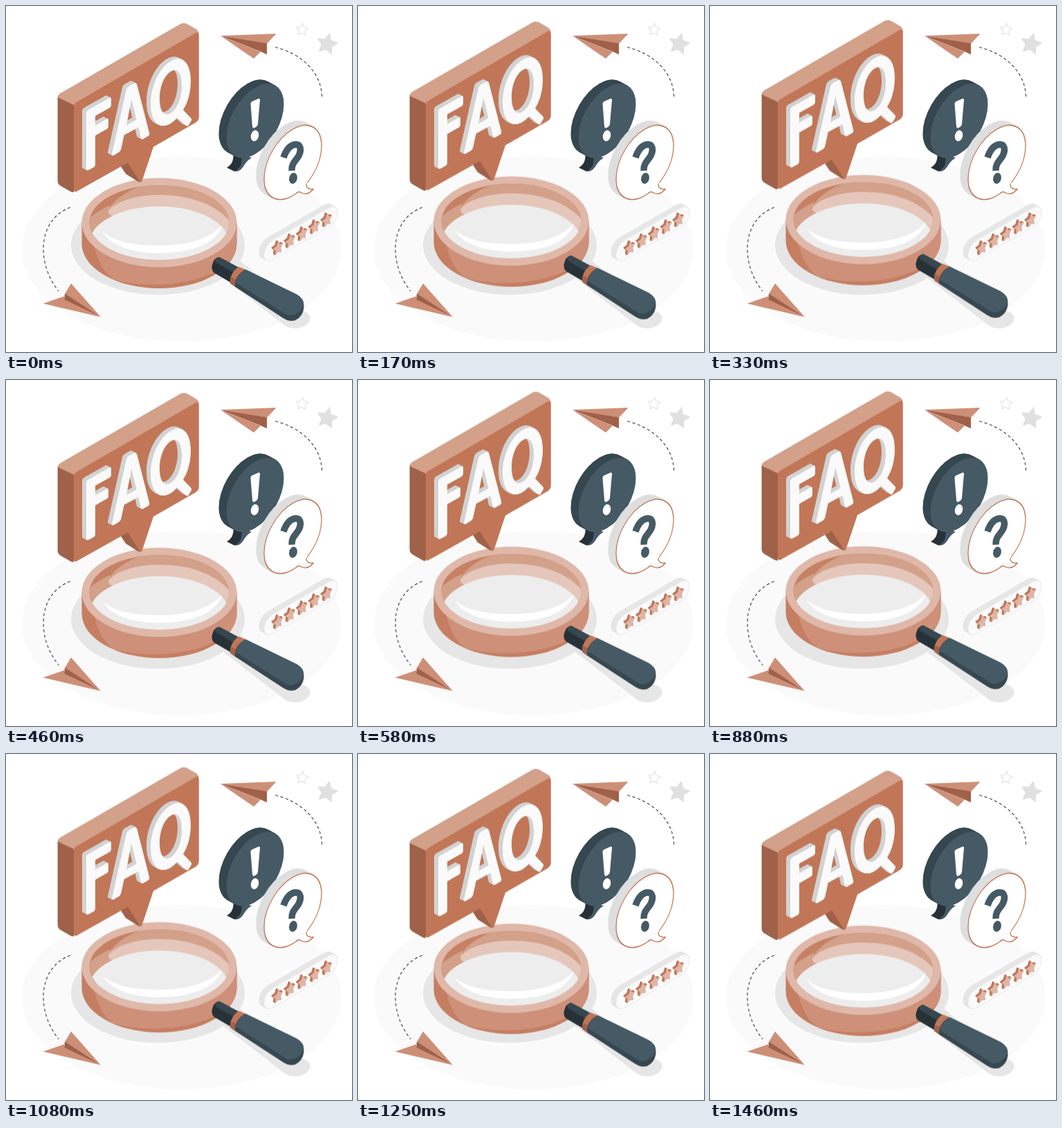
Animation of 500x500 px, one loop 1500 ms. Source, as an HTML page:

```html
<!DOCTYPE html>
<html lang="en">
<head>
<meta charset="utf-8">
<title>FAQ</title>
<style>
  html, body { margin: 0; width: 100%; height: 100%; overflow: hidden; background: #fff; }
  svg { display: block; width: 100%; height: 100%; }
  .float { animation: float 1.5s linear infinite; }
  @keyframes float { 50% { transform: translateY(-10px); } }
  .trail { fill: none; stroke: #4a4a4a; stroke-width: 1.2; stroke-dasharray: 4.2 3.6; }
  .light { fill: #ce8f77; }
  .mid { fill: #c17657; }
  .dark { fill: #9f6149; }
</style>
</head>
<body>
<svg viewBox="0 0 500 500" role="img" aria-label="FAQ">
  <defs>
    <path id="star" stroke-linejoin="round" d="M0-10L2.9-4L9.5-3.1L4.8 1.5L5.9 8.1L0 5L-5.9 8.1L-4.8 1.5L-9.5-3.1L-2.9-4Z"/>
    <g id="rating-star"><use href="#star" transform="matrix(.68 -.39 0 .9 0 0)" stroke-width="1.5"/></g>
    <ellipse id="oval" rx="41.5" ry="48" transform="matrix(1 -.577 0 1 0 0)"/>
    <rect id="pill" x="-53" y="-14" width="106" height="28" rx="13" transform="matrix(1 -.577 0 1 0 0)"/>
    <g id="letters" fill-rule="evenodd">
      <path d="M116 154Q116 151 118.500 149.500L149.500 132Q152 130.800 152 133.500V142.500Q152 145 150 146.200L129 158V172L145.500 162.700Q148 161.500 148 164V173Q148 175.500 146 176.700L129 186.500V228.500Q129 231 127 232.200L119 236.500Q116 237.700 116 234.500Z"/>
      <path d="M174 120Q175 116.500 178 114.700L185.500 110.800Q188.500 109.500 189.300 113L207.300 183.500Q207.900 186 205.500 187.300L198.500 191.200Q195.500 192.800 194.900 190L191.500 174.500L170.700 185.700L166.300 206Q165.700 209 163.300 210.500L156 214.800Q152.300 216.500 153.200 212.500ZM181.300 134L174 171.700L188.500 163.500Z"/>
      <path d="M238 79C255 69 267 82 267 107.300C267 125 262.500 139 256 149.500L267.500 161.500Q269 163 267.500 165.500L264 171.500Q262.300 174 260 171.700L247.500 160.500Q243 166 238 169C221 179 209 166 209 140.700C209 116 221 89 238 79ZM238 94C228 100 222 117 222 133.200C222 151 228 160 238 154C248 148 254 131 254 114.800C254 97 248 88 238 94Z"/>
    </g>
    <clipPath id="hole"><ellipse cx="221.500" cy="313" rx="101" ry="54"/></clipPath>
    <clipPath id="wall"><path d="M109.500 313V343.500A112 64.500 0 0 0 333.500 343.500V313Z"/></clipPath>
  </defs>

  <ellipse cx="254" cy="351.500" rx="231" ry="133.500" fill="#fafafa"/>
  <g fill="#e6e6e6">
    <ellipse cx="219.500" cy="345.500" rx="125.500" ry="72"/>
    <path d="M290 375L318 396L402 461Q411 468 425 465Q440 460 439.500 450Q438 443 428 440L330 362Z"/>
  </g>

  <path class="trail" d="M389 59.500C428 69 456 97 456.500 131"/>
  <path class="light" d="M310 43L390.500 40L377 54.500Z"/>
  <path class="dark" d="M310 43L377 54V70L366 65Z"/>
  <path class="light" d="M310 43L368 66L358 76Z"/>

  <path class="trail" d="M93 291C46 308 43 371 76 412"/>
  <path class="light" d="M94 401L137 449.500L85 416Z"/>
  <path class="dark" d="M85 415.500L137 449.500L84 425Z"/>
  <path class="light" d="M53.500 430L84 419.500V424L137 449.500Z"/>

  <use href="#star" transform="translate(428 34.500) rotate(6) scale(.93)" fill="#fff" stroke="#e3e3e3" stroke-width="1.2"/>
  <use href="#star" transform="translate(464 55) rotate(12) scale(1.48)" fill="#e0e0e0" stroke="#e0e0e0" stroke-width="1.2"/>

  <path fill="#263238" d="M328 208C330 222 327 229 319 233.500L330 239C343 238 342 228 347 218Z"/>
  <path fill="#455a64" d="M340 214C342 228 339 234 330 239C344 240 342 226 355 219.500Z"/>
  <g data-shape="oval" data-at="360 166" data-depth="11 6" data-side="#37474f" fill="#455a64"></g>
  <g fill="#fff">
    <path d="M353.500 141.500Q353.300 139 355.500 138L364.500 134Q367.300 133 367 136L364 170.500Q363.700 173.500 361 175L358.500 176.300Q356.300 177 356 174Z"/>
    <ellipse cx="359.500" cy="187.500" rx="5.600" ry="8" transform="rotate(14 359.500 187.500)"/>
  </g>

  <g data-shape="oval" data-at="414.500 226" data-depth="11 6" data-side="#dedede" fill="#fff" stroke="#c17657" stroke-width="1.3"></g>
  <path fill="#fff" d="M421 266L434 254L437 264L432 270Z"/>
  <path fill="#fff" stroke="#c17657" stroke-width="1.3" d="M419.500 270.500C423 267 425 269 428 270.500C434 272.500 440 270 444 264.500C438 265.500 433.500 263 434 257"/>
  <path fill="none" stroke="#455a64" stroke-width="9.500" d="M401 219C405 207 411 201 418 200C426 199.500 427 208 423.500 215.500C420 223 412.500 226 413 238"/>
  <ellipse cx="415" cy="249" rx="5.800" ry="8" fill="#455a64" transform="rotate(14 415 249)"/>

  <g data-shape="pill" data-at="426 329" data-depth="7 4" data-side="#e6e6e6" fill="#fafafa" stroke="#e6e6e6" stroke-width=".8"></g>
  <g id="rating"></g>

  <g class="float">
    <path fill="#c57e61" d="M109.500 313V343.500A112 64.500 0 0 0 333.500 343.500V313Z"/>
    <path fill="#ce9079" clip-path="url(#wall)" d="M126 340C132 369 141 386 157 396C203 407 262 405 302 384L334 360V313Z"/>
    <ellipse cx="221.500" cy="313" rx="112" ry="64.500" fill="#dfb8a9"/>
    <g clip-path="url(#hole)">
      <rect x="115" y="250" width="215" height="125" fill="#c68164"/>
      <path fill="#d3a089" d="M212 255C182 262 156 278 148 295Q149 306 160 304L330 340V250Z"/>
      <path fill="#d3a089" d="M115 312C126 301 137 294 150 288L156 306L126 332H115Z"/>
      <path fill="#e5c6ba" d="M148 296C160 281 190 273 222 273C264 273 304 286 326 314V345L157 304Q147 303 148 296Z"/>
      <ellipse cx="221.500" cy="343" rx="101" ry="53.500" fill="#ededed"/>
      <path fill="#fff" d="M140 326C158 342 188 346 222 346C262 346 294 337 312 317C304 344 266 357 222 357C184 357 151 347 140 326Z"/>
    </g>

    <g transform="translate(0 .8)">
      <path fill="#263238" d="M308 362L336 377L325 399L301 385Q297 382 297.500 375Q300 363 308 362Z"/>
      <path fill="#37474f" d="M308 362L336 377L331 386L302 369Q304 362.500 308 362Z"/>
      <path class="mid" d="M336 376L346 380L331 405L324 400Q323 386 336 376Z"/>
      <path class="dark" d="M324.500 391L333.500 395L331 405L324 400Z"/>
      <path fill="#37474f" d="M346 380L420 416Q430.500 422 430.500 435Q429 448 418 453.500Q409 456 400 450L331 405Q330 389 346 380Z"/>
      <path fill="#455a64" d="M346 380L420 416Q430.500 422 430.500 431Q427 442 415 446Q408 448 402 443L332 399Q335 386 346 380Z"/>
    </g>

    <path class="dark" d="M74.600 131L98 140V268.500Q96 270 93 268L79 260Q74.600 257.500 74.600 252Z"/>
    <path class="dark" d="M165.500 231L177 225L195 254.500Q191 254.500 188 252L173 242.500Z"/>
    <path fill="#d3a089" d="M74.600 132Q75 128.500 78 126.500L252 26Q257 23.500 262 26L275 33.500Q278 35.500 278.500 40L98 143Z"/>
    <path class="mid" d="M98 145Q98 141.500 101 139.500L274 39Q278.800 36.500 278.800 42V160Q278.800 165.500 274 168.500L213 203.500L196.500 253Q195.300 256 193 253L176 226.500L102 268Q98 270 98 265Z"/>
    <g data-shape="letters" data-at="0 .7" data-depth="6 3" data-side="#d2d2d2" fill="#fafafa"></g>
  </g>
</svg>
<script>
  const NS = 'http://www.w3.org/2000/svg';
  const numbers = text => text.split(' ').map(Number);

  function place(parent, shape, x, y, attrs = {}) {
    const use = document.createElementNS(NS, 'use');
    const all = { href: '#' + shape, transform: `translate(${x} ${y})`, ...attrs };
    for (const name in all) use.setAttribute(name, all[name]);
    parent.append(use);
  }

  // Stack copies from back to front to give a flat shape thickness.
  function extrude(parent, shape, [x, y], [dx, dy], side) {
    const steps = Math.ceil(dx * 2);
    for (let i = steps; i > 0; i--) {
      place(parent, shape, x - dx * i / steps, y - dy * i / steps, { fill: side, stroke: side });
    }
    place(parent, shape, x, y);
  }

  for (const g of document.querySelectorAll('[data-shape]')) {
    const { shape, at, depth, side } = g.dataset;
    if (!g.hasAttribute('stroke')) g.setAttribute('stroke-width', 0);
    extrude(g, shape, numbers(at), numbers(depth), side);
  }

  const rating = document.getElementById('rating');
  rating.setAttribute('fill', '#dfb5a5');
  rating.setAttribute('stroke', '#dfb5a5');
  for (let i = 0; i < 5; i++) {
    extrude(rating, 'rating-star', [393.5 + 17.7 * i, 350 - 10.1 * i], [3, 1.7], '#c17657');
  }
</script>
</body>
</html>
```
